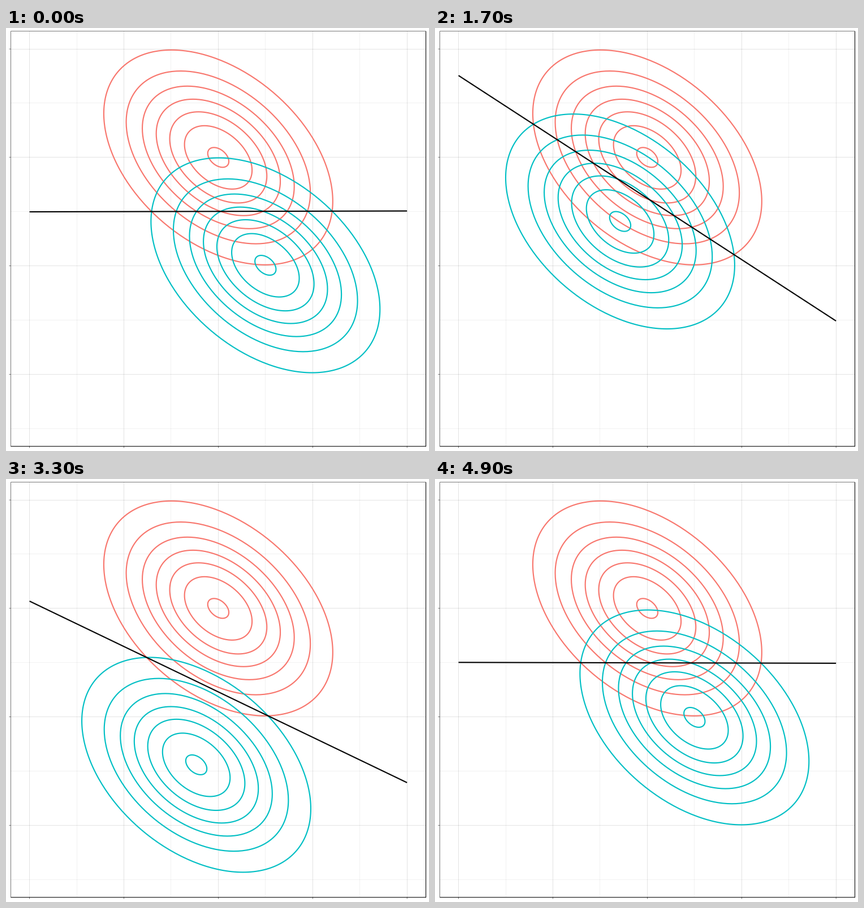
Write a matplotlib script that moves like this. It is 748 px wide and 748 px high and loops after 5 s.

```python
import numpy as np
import matplotlib.pyplot as plt
from matplotlib.animation import FuncAnimation
from matplotlib.patches import Rectangle

SIZE, FRAMES, INTERVAL = 748, 50, 100
LEFT, TOP, RIGHT, BOTTOM = 8.25, 5.5, 742.5, 739.75   # panel edges in pixels
MM = 72.27 / 25.4 * 0.75                              # line-width unit in pixels
RED, TEAL = "#F8766D", "#00BFC4"

COV = np.array([[1.5, -0.5], [-0.5, 1.0]])
PRECISION = np.linalg.inv(COV)
RED_MEAN = np.array([0.0, 2.0])
LEVELS = np.arange(1, 8) * 0.02
PEAK = 1 / (2 * np.pi * np.sqrt(np.linalg.det(COV)))
RADII = np.sqrt(2 * np.log(PEAK / LEVELS))

# Data ranges with five percent of padding on each side
X_MIN, X_MAX = -4.4, 4.4
REACH = RADII[0]
PAD = 0.05 * (3 + 2 * REACH)
Y_MIN, Y_MAX = -1 - REACH - PAD, 2 + REACH + PAD


def px(x):
    return LEFT + (x - X_MIN) / (X_MAX - X_MIN) * (RIGHT - LEFT)


def py(y):
    return TOP + (Y_MAX - y) / (Y_MAX - Y_MIN) * (BOTTOM - TOP)


fig = plt.figure(figsize=(SIZE / 72, SIZE / 72), dpi=72, facecolor="white")
ax = fig.add_axes([0, 0, 1, 1])
ax.set_xlim(0, SIZE)
ax.set_ylim(SIZE, 0)
ax.axis("off")


def bar(x0, y0, x1, y1, z=1):
    ax.add_patch(Rectangle((x0, y0), x1 - x0, y1 - y0, facecolor="black",
                           linewidth=0, snap=False, zorder=z))


def v_bar(x, y0, y1, width):
    bar(x - width / 2, y0, x + width / 2, y1)


def h_bar(y, x0, x1, width):
    bar(x0, y - width / 2, x1, y + width / 2)


def curve(color, z):
    return ax.plot([], [], color=color, lw=MM, snap=False, zorder=z,
                   solid_capstyle="butt", solid_joinstyle="round")[0]


MAJOR, MINOR, TICK, BORDER = 0.05 * MM, 0.025 * MM, 0.25 * MM, 0.5 * MM

for x in range(-4, 5):
    v_bar(px(x), TOP, BOTTOM, MINOR if x % 2 else MAJOR)
    if x % 2 == 0:
        v_bar(px(x), BOTTOM, BOTTOM + 2.75, TICK)
for y in range(-3, 5):
    h_bar(py(y), LEFT, RIGHT, MINOR if y % 2 else MAJOR)
    if y % 2 == 0:
        h_bar(py(y), LEFT - 2.75, LEFT, TICK)

# The frame's outer half is cut off on the left and top
half = BORDER / 2
bar(LEFT, TOP, LEFT + half, BOTTOM + half, 6)
bar(LEFT + half, TOP, RIGHT + half, TOP + half, 6)
bar(RIGHT - half, TOP + half, RIGHT + half, BOTTOM + half, 6)
bar(LEFT + half, BOTTOM - half, RIGHT - half, BOTTOM + half, 6)

turn = np.linspace(0, 2 * np.pi, 241)
UNIT_ELLIPSE = np.linalg.cholesky(COV) @ np.array([np.cos(turn), np.sin(turn)])


def place(curves, mean):
    for line, radius in zip(curves, RADII):
        x, y = mean[:, None] + radius * UNIT_ELLIPSE
        line.set_data(px(x), py(y))


red_curves = [curve(RED, 2) for _ in RADII]
teal_curves = [curve(TEAL, 3) for _ in RADII]
boundary = curve("black", 4)
place(red_curves, RED_MEAN)
ANGLES = np.linspace(0.01, 2 * np.pi - 0.01, FRAMES)


def update(frame):
    angle = ANGLES[frame]
    mean = np.array([np.cos(angle), np.sin(angle)])
    place(teal_curves, mean)

    # Both densities are equal along this line
    normal = PRECISION @ (mean - RED_MEAN)
    middle = (mean + RED_MEAN) / 2
    x = np.array([-4.0, 4.0])
    y = middle[1] - normal[0] / normal[1] * (x - middle[0])
    boundary.set_data(px(x), py(y))
    return [*teal_curves, boundary]


anim = FuncAnimation(fig, update, frames=FRAMES, interval=INTERVAL,
                     repeat=True, repeat_delay=0, blit=False)
plt.show()
```
